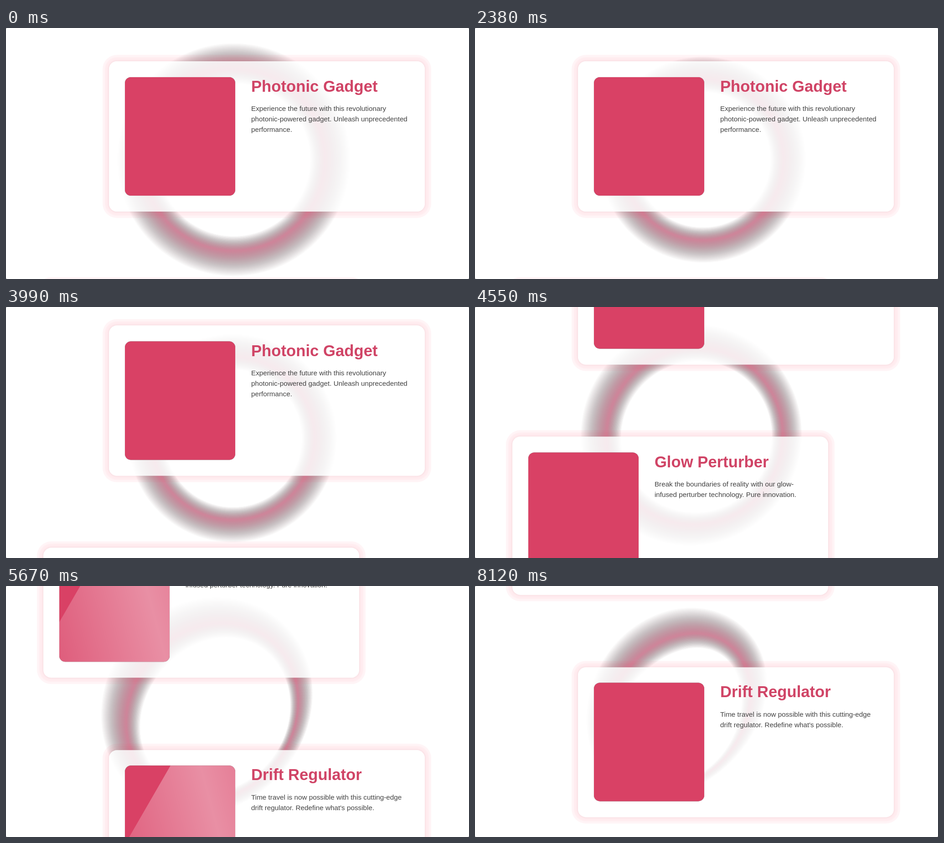
An HTML page with a canvas that plays this animation: 1016 px wide and 551 px high, repeating every 8.19 s.

```html
<!DOCTYPE html>
<html lang="en">
<head>
<meta charset="utf-8">
<title>Product cards</title>
<style>
  html, body { margin: 0; width: 100%; height: 100%; overflow: hidden; background: #555; }
  body { font-family: "Liberation Sans", Arial, sans-serif; }
  #stage { position: relative; width: 1016px; height: 551px; overflow: hidden; background: #fff; border-radius: 2px; }
  #ring { position: absolute; left: 0; top: 0; }
  #page { position: absolute; left: 0; top: 0; width: 1016px; }
  .card {
    position: absolute; width: 693.6px; height: 329.6px; border-radius: 17.3px;
    background: rgba(255, 255, 255, .83);
    box-shadow:
      0 0 4px rgba(130, 70, 85, .12),
      0 0 8px 4px rgba(255, 70, 110, .03),
      0 0 2px 9px rgba(255, 70, 110, .03),
      0 0 1px 14px rgba(255, 70, 110, .06);
  }
  .image {
    position: absolute; left: 35.3px; top: 34.7px; width: 242.3px; height: 260px;
    border-radius: 13px; background: #d94165; overflow: hidden;
    box-shadow: 0 0 1px rgba(60, 50, 55, .8);
  }
  .shine {
    position: absolute; left: -243.3px; top: -6px; width: 485.6px; height: 520px;
    background: linear-gradient(45deg, rgba(255, 255, 255, 0), rgba(255, 255, 255, .41), rgba(255, 255, 255, 0));
  }
  .text { position: absolute; left: 312.2px; top: 34.7px; white-space: nowrap; }
  h2 { margin: 0; font-size: 34.7px; line-height: 40px; font-weight: bold; color: #d04466; }
  p { margin: 17.5px 0 0; font-size: 15.27px; line-height: 23px; color: #424242; }
</style>
</head>
<body>
<div id="stage">
  <canvas id="ring" width="1016" height="551"></canvas>
  <div id="page"></div>
</div>
<script>
const LOOP = 8190;
const SCROLL_START = 3920, SCROLL_END = 6450, SCROLL_MAX = 871.6;
const cards = [
  ["Photonic Gadget", "Experience the future with this revolutionary<br>photonic-powered gadget. Unleash unprecedented<br>performance."],
  ["Glow Perturber", "Break the boundaries of reality with our glow-<br>infused perturber technology. Pure innovation."],
  ["Drift Regulator", "Time travel is now possible with this cutting-edge<br>drift regulator. Redefine what's possible."]
];
const page = document.getElementById("page");
const ctx = document.getElementById("ring").getContext("2d");

page.innerHTML = cards.map(([name, text], i) =>
  `<div class="card" style="left:${i % 2 ? 81.7 : 225.8}px;top:${73 + i * 488.3}px">
    <div class="image"><div class="shine"></div></div>
    <div class="text"><h2>${name}</h2><p>${text}</p></div>
  </div>`).join("");
const shines = document.querySelectorAll(".shine");

const mix = (a, b, f) => a + (b - a) * f;
const clamp = v => Math.min(1, Math.max(0, v));
const rad = deg => deg * Math.PI / 180;

// Share of the page scrolled, easing out
function scrollAt(t) {
  const f = clamp((t - SCROLL_START) / (SCROLL_END - SCROLL_START));
  return 1 - (1 - f) ** 1.33;
}

// The ring swells while scrolling and relaxes afterwards
function swellAt(t) {
  if (t < SCROLL_START) return .14 * Math.exp(-t / 850);
  if (t < SCROLL_END) return .125 * (1 - Math.exp((SCROLL_START - t) / 400));
  return .125 * Math.exp((SCROLL_END - t) / 850);
}

// Pink core turning grey, then fading to white; d runs from core to rim
function tone(d) {
  const grey = clamp(d * 1.6), alpha = 1 - d ** 1.4;
  const over = (pink, dark) => Math.round(mix(255, mix(pink, dark, grey), alpha));
  return `rgb(${over(209, 145)}, ${over(132, 132)}, ${over(154, 135)})`;
}

const LEVELS = 28, DOTS = 220, TILT = rad(-52), INSET = .28;

// A tilted ring: s is the share scrolled, heavy side turns with it
function drawRing(s, scale) {
  const bend = s ** 3;
  const cx = mix(503, 500 - 56 * s, scale), cy = mix(288, 289 - 18 * s, scale);
  const a = (186 + 4 * s) * scale, b = (186 - 36 * bend) * scale;
  const side = rad(-160 + 55 * bend);
  const cos = Math.cos(TILT), sin = Math.sin(TILT);
  const dots = Array.from({ length: DOTS }, (_, i) => {
    const u = i / DOTS * 2 * Math.PI;
    const p = a * Math.cos(u), q = b * Math.sin(u);
    const x = p * cos - q * sin, y = p * sin + q * cos;
    const angle = Math.atan2(y, x);
    const r = (40 - 11 * s + 18 * s * Math.cos(angle - side)) * scale;
    return { x: cx + x, y: cy + y, r, nx: Math.cos(angle), ny: Math.sin(angle) };
  });

  ctx.clearRect(0, 0, 1016, 551);
  ctx.lineWidth = 2;
  for (let n = LEVELS; n > 0; n--) {
    const d = n / LEVELS;
    // The core lies nearer the inner rim
    const ring = dots.map(({ x, y, r, nx, ny }) => {
      const shift = r * (1 - d) * INSET;
      return [x - nx * shift, y - ny * shift, r * d];
    });
    ctx.fillStyle = ctx.strokeStyle = tone(d);
    ctx.beginPath();
    for (const [x, y, r] of ring) {
      ctx.moveTo(x + r, y);
      ctx.arc(x, y, r, 0, 2 * Math.PI);
    }
    ctx.fill();
    ctx.beginPath();
    ring.forEach(([x, y]) => ctx.lineTo(x, y));
    ctx.closePath();
    ctx.stroke();
  }
}

// The shine crosses each image at a steady pace, once per period
const PERIOD = 2122, CROSSING = 1315;
function shineAt(t) {
  const phase = (t - CROSSING + 1.5 * PERIOD) % PERIOD - PERIOD / 2;
  return 133 + .9 * phase;
}

function render(t) {
  const s = scrollAt(t);
  page.style.transform = `translateY(${-s * SCROLL_MAX}px)`;
  drawRing(s, 1 + swellAt(t));
  const move = `translateX(${shineAt(t)}px) rotate(30deg)`;
  shines.forEach(el => el.style.transform = move);
}

const start = performance.now();
function tick() {
  render((performance.now() - start) % LOOP);
  requestAnimationFrame(tick);
}
tick();
</script>
</body>
</html>
```
